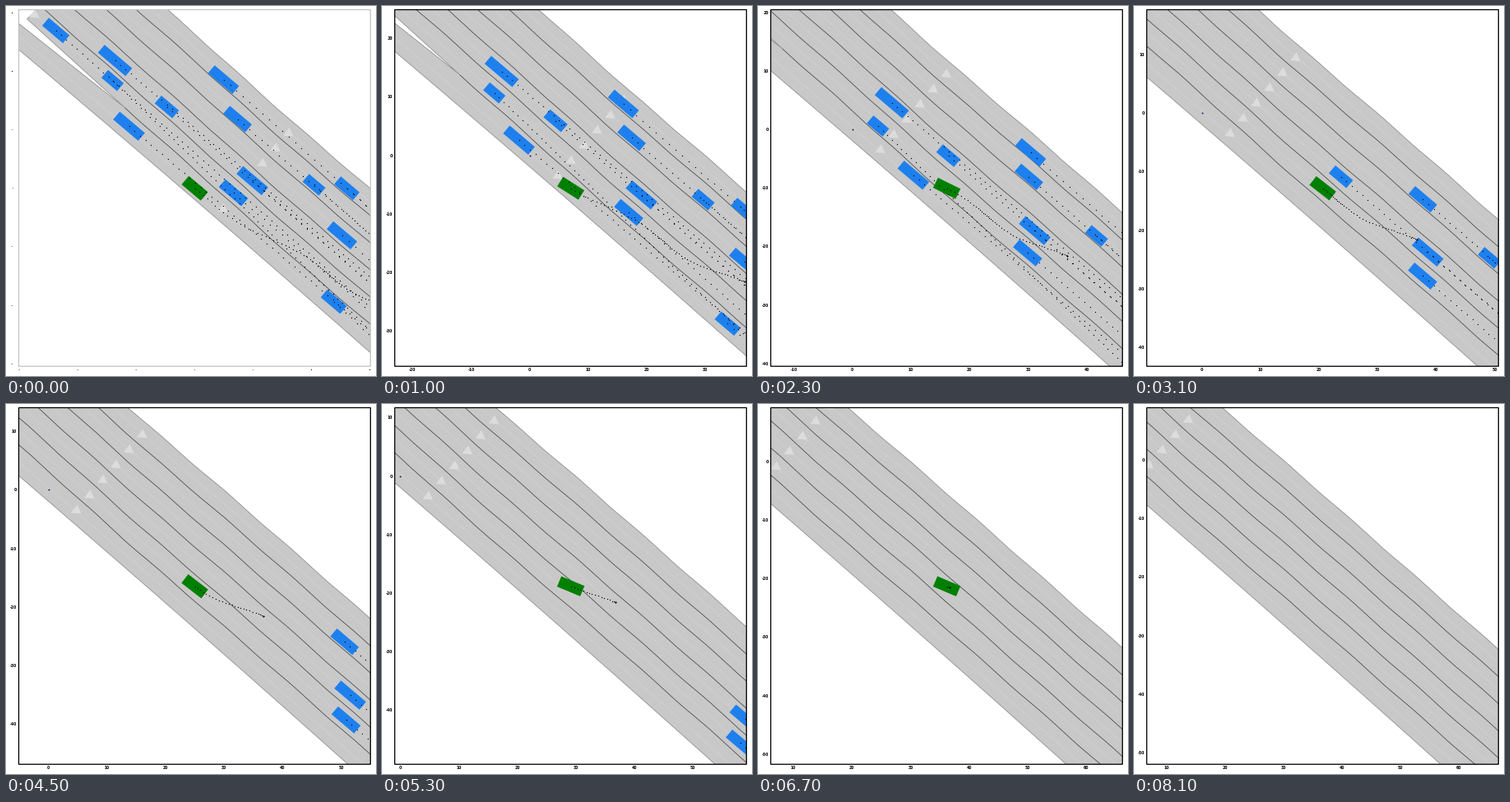
These frames come from a looping animation (450x450 px, 8.6 s). A matplotlib script:

```python
import numpy as np
import matplotlib.pyplot as plt
from matplotlib.animation import FuncAnimation
from matplotlib.patches import Polygon, Rectangle
from matplotlib.transforms import Affine2D

SIZE, DPI = 450, 100
PX = 72 / DPI                  # one pixel in points
CENTRE = np.array([229.6, 221.7])
GRID = 71.2                    # pixels per ten metres
LEFT, TOP, RIGHT, BOTTOM = 15.5, 4.5, 443.3, 438.2
LAST = 81                      # own vehicle is gone from this step on
SLOPE = 0.881

fig = plt.figure(figsize=(SIZE / DPI, SIZE / DPI), dpi=DPI, facecolor="white")
ax = fig.add_axes([0, 0, 1, 1])
ax.set_xlim(0, SIZE)
ax.set_ylim(SIZE, 0)
ax.axis("off")

frame = Rectangle((LEFT, TOP), RIGHT - LEFT, BOTTOM - TOP, fill=False,
                  lw=1.3 * PX, zorder=20, joinstyle="miter", snap=False)
ax.add_patch(frame)
camera = Affine2D()
world = camera + ax.transData


def shape(points, color, z):
    patch = Polygon(points, closed=True, fc=color, ec="none", zorder=z,
                    transform=world)
    ax.add_patch(patch)
    patch.set_clip_path(frame)
    return patch


def stroke(x, y, color, z):
    line, = ax.plot(x, y, color=color, lw=0.8 * PX, zorder=z, transform=world)
    line.set_clip_path(frame)


def points(color, size, z):
    line, = ax.plot([0], [0], "o", color=color, ms=size * PX, mew=0, zorder=z,
                    transform=world)
    line.set_clip_path(frame)
    return line


# Road
def road(x):
    return SLOPE * x - 188


DARK, EDGE, FAINT = "#4a4a4a", "#8c8c8c", "#d1d1d1"
LANE = 33

xs = np.arange(-240, 521)
upper = (road(xs) + 2.4 * np.exp(-((xs - 110) / 90) ** 2)
         + 0.6 * np.cos(2 * np.pi * (xs - 96) / 80))
lower = 13.8 + 0.862 * xs + 4.5e-5 * xs ** 2

shape(np.r_[np.c_[xs, upper], np.c_[xs, lower][::-1]], "#c8c8c8", 1)
for k in range(1, 6):
    part = xs >= (-85 if k == 5 else -240)
    stroke(xs[part], (upper + LANE * k)[part], DARK, 3)
    stroke(xs, upper + LANE * (k - 0.5), FAINT, 2)
stroke(xs, lower - LANE / 2, FAINT, 2)
stroke(xs, upper, EDGE, 3)
stroke(xs, lower, EDGE, 3)

# Gap between the joining ramp and the main road
gap = [(-192, -217), (-204, -206), (-85, -98), (-230, -213)]
shape(gap + [(-230, -240), (-192, -240)], "white", 4)
stroke(*zip(*gap), EDGE, 5)

arrows = [(114 - 16 * k, -68 + 18.4 * k) for k in range(6)] + [(-195, -212)]
for x, y in arrows:
    shape([(x + 1, y - 6), (x - 6.5, y + 4), (x + 6, y + 5)], "#dcdcdc", 6)

points("#000060", 1.8, 7)      # world origin


# Vehicles
def box(centre, length, width, angle):
    c, s = np.cos(angle), np.sin(angle)
    corners = np.array([(-1, -1), (1, -1), (1, 1), (-1, 1)])
    return corners * (length / 2, width / 2) @ [(c, s), (-s, c)] + centre


class Car:
    """Drives along the road at a fixed or slowly changing speed."""
    ANGLE = np.radians(40.3)

    def __init__(self, x, side, speed, length, end, gain=0, drift=0):
        self.x, self.side, self.speed = x, side, speed
        self.gain, self.drift = gain, drift
        self.length, self.end = length, end
        self.patch = shape(self.outline(0), "#1e80ee", 8)

    def at(self, t):
        x = self.x + self.speed * t + self.gain * t ** 2
        return np.stack([x, road(x) + self.side + self.drift * t], axis=-1)

    def outline(self, t):
        return box(self.at(t), self.length, 12.5, self.ANGLE)

    def update(self, t):
        """Move the car and return the points still ahead of it."""
        here = t <= self.end
        self.patch.set_visible(here)
        self.patch.set_xy(self.outline(t))
        return self.at(np.arange(t, 8.05 if here else t, 0.1))


cars = [
    Car(-169, 145, 64, 33, 0.5),
    Car(-97, 118, 63, 44, 2.4, drift=-2),
    Car(-100, 145, 57, 25, 2.4, drift=5),
    Car(-34, 119, 65.5, 28, 3.8, drift=-0.8),
    Car(-80, 183, 67, 40, 2.4, drift=-2),
    Car(35, 25, 79, 39, 2.4),
    Car(52, 58, 73, 35, 5.2, gain=-1, drift=-0.6),
    Car(145, 56, 66, 26, 4.4),
    Car(185, 25, 75, 30, 3.0),
    Car(70, 117, 66, 40, 8.0, drift=-0.6),
    Car(47, 152, 74.5, 36, 8.0, gain=-1, drift=-0.7),
    Car(179, 87.5, 82, 38, 2.5),
    Car(169, 177, 70, 31, 3.0, gain=1.8, drift=3.5),
]

# Own vehicle: progress through key times, then two lane changes over x
KEY_T = np.array([0, 1.0, 1.7, 3.1, 4.5, 5.9, 7.0])
KEY_X = np.array([0, 50, 86, 147, 178, 230, 261.5])
KEY_V = np.gradient(KEY_X, KEY_T)
KEY_V[-1] = 0


def smooth(s):
    s = np.clip(s, 0, 1)
    return s * s * (3 - 2 * s)


def progress(t):
    t = np.clip(t, 0, KEY_T[-1])
    k = np.clip(np.searchsorted(KEY_T, t, side="right") - 1, 0, 5)
    h = KEY_T[k + 1] - KEY_T[k]
    s = (t - KEY_T[k]) / h
    return (KEY_X[k] + (KEY_X[k + 1] - KEY_X[k]) * smooth(s)
            + h * s * (1 - s) * ((1 - s) * KEY_V[k] - s * KEY_V[k + 1]))


def ego_y(x):
    return (road(x) + 188 - 0.04 * x
            - 32.3 * smooth((x - 32) / 120) - 40 * smooth((x - 174) / 116))


route_x = progress(np.arange(LAST) / 10)
route = np.c_[route_x, ego_y(route_x)]
ego = shape(box((0, 0), 30.5, 13.6, 0), "#008000", 9)
dots = points("black", 1.3, 10)


# Axis labels
def label(ha):
    return ax.text(0, 0, "", ha=ha, va="center_baseline", weight="bold",
                   family="DejaVu Sans")


x_labels = [label("center") for _ in range(7)]
y_labels = [label("right") for _ in range(7)]


def set_labels(texts, zero, low, high, sign, place, size):
    ticks = [n for n in range(-9, 10) if low <= zero + n * GRID <= high]
    for text in texts:
        text.set_visible(False)
    for text, n in zip(texts, ticks):
        text.set(text=str(sign * n * 10), position=place(zero + n * GRID),
                 fontsize=size * PX, visible=True)


def draw(i):
    i = min(i, LAST)
    here = route[min(i, LAST - 1)]
    ox, oy = CENTRE - here
    camera.clear().translate(ox, oy)

    ahead = [car.update(i / 10) for car in cars] + [route[i:]]
    dots.set_data(*np.vstack(ahead).T)
    x = here[0]
    ego.set_xy(box(here, 30.5, 13.6, np.arctan(ego_y(x + 0.5)
                                               - ego_y(x - 0.5))))
    ego.set_visible(i < LAST)

    # The opening step shows a pale frame with barely visible labels
    frame.set_edgecolor("black" if i else "#c4c4c4")
    size = 4.6 if i else 1.6
    set_labels(x_labels, ox, LEFT - 1, RIGHT, 1, lambda p: (p, 442.3), size)
    set_labels(y_labels, oy, TOP, BOTTOM, -1,
               lambda p: (13.3 if i else 9, p), size)
    return []


anim = FuncAnimation(fig, draw, frames=86, interval=100, repeat=True,
                     repeat_delay=0, init_func=lambda: draw(0), blit=False)
plt.show()
```
